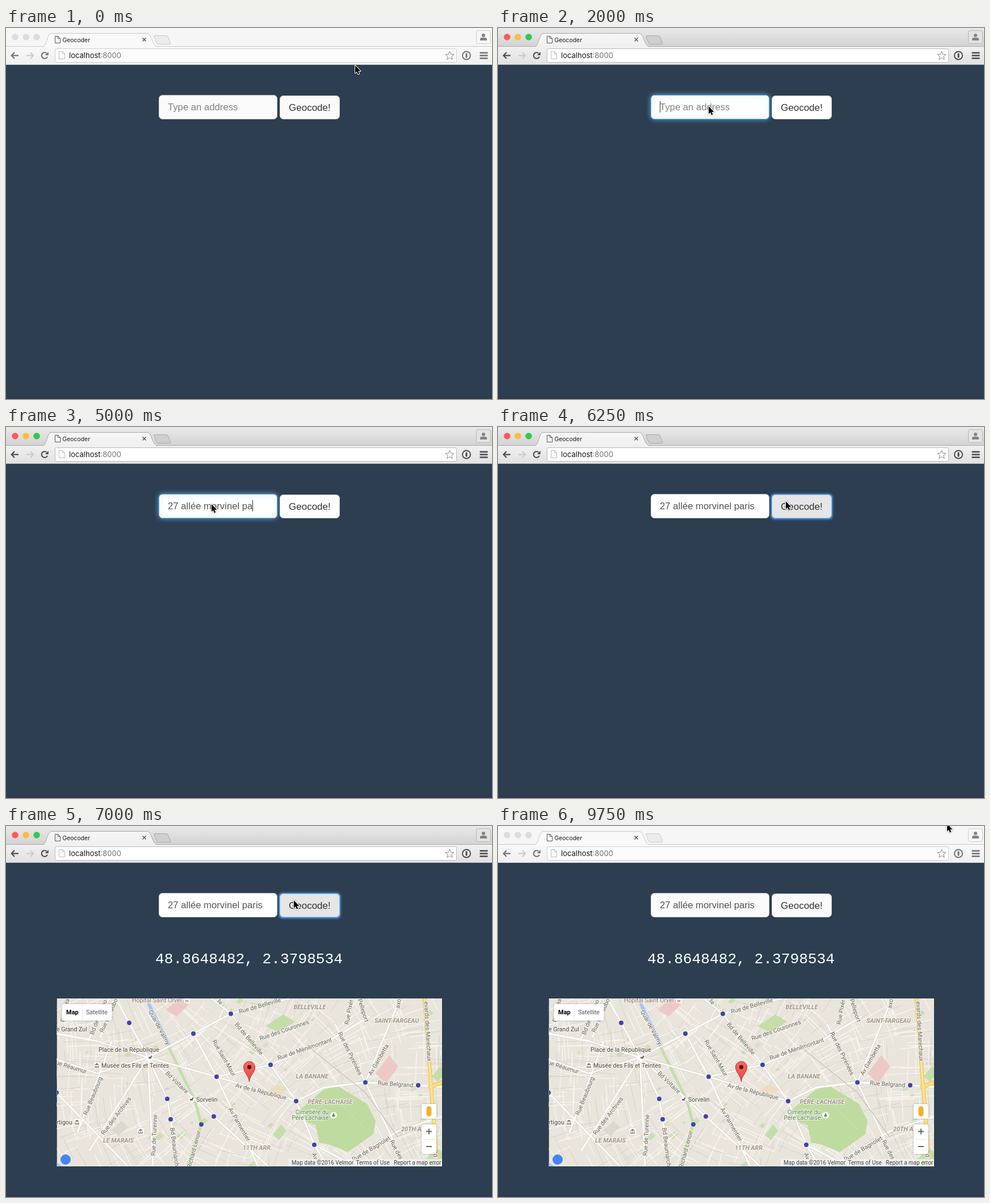
An HTML page with a canvas for the animation above (10000 ms loop, 856x654 px).

```html
<!DOCTYPE html>
<html lang="en">
<head>
<meta charset="utf-8">
<title>Geocoder</title>
<style>
html, body { margin: 0; width: 100%; height: 100%; overflow: hidden; background: #2c3e50; }
canvas { display: block; width: 856px; height: 654px; }
</style>
</head>
<body>
<canvas id="stage" width="856" height="654"></canvas>
<script>
const W = 856, H = 654, LOOP = 10000, STEP = 250;
const MAP = { x: 89.5, y: 304, w: 678.5, h: 296 };
const ADDRESS = '27 allée morvinel paris';
const SANS = '"Liberation Sans", Arial, sans-serif';
const UI = 'Inter, sans-serif';
const LABEL = 'Roboto, sans-serif';
const MONO = '"Liberation Mono", monospace';
const stage = document.getElementById('stage').getContext('2d');
let c = stage;

// ---- helpers ----
function trace(pts, closed) {
  c.beginPath();
  for (let i = 0; i < pts.length; i += 2) c.lineTo(pts[i], pts[i + 1]);
  if (closed) c.closePath();
}
function line(pts, color, width) {
  trace(pts);
  c.strokeStyle = color;
  c.lineWidth = width;
  c.stroke();
}
function poly(pts, color) {
  trace(pts, true);
  c.fillStyle = color;
  c.fill();
}
function rect(x, y, w, h, color) {
  c.fillStyle = color;
  c.fillRect(x, y, w, h);
}
function box(x, y, w, h, r, fill, stroke) {
  c.beginPath();
  c.roundRect(x, y, w, h, r);
  c.fillStyle = fill;
  c.fill();
  if (stroke) {
    c.strokeStyle = stroke;
    c.lineWidth = 1;
    c.stroke();
  }
}
function disc(x, y, r, color) {
  c.beginPath();
  c.arc(x, y, r, 0, 7);
  c.fillStyle = color;
  c.fill();
}
function patch(x, y, rx, ry, color) {
  poly([x - rx, y + ry * .3, x + rx * .2, y - ry, x + rx, y - ry * .2, x - rx * .1, y + ry], color);
}
function text(s, x, y, font, color, align = 'left') {
  c.font = font;
  c.textAlign = align;
  c.fillStyle = color;
  c.fillText(s, x, y);
}
function shade(y0, y1, top, bottom) {
  const g = c.createLinearGradient(0, y0, 0, y1);
  g.addColorStop(0, top);
  g.addColorStop(1, bottom);
  return g;
}
function glow(color, blur, draw) {
  c.save();
  c.shadowColor = color;
  c.shadowBlur = blur;
  draw();
  c.restore();
}

// ---- map ----
const HUBS = {
  magenta: [217, 347], goncourt: [330, 366], belle: [396, 331], maur: [371, 442],
  menil: [466, 421], lachaise: [511, 485], filles: [284, 481], sebastien: [290, 517],
  ambroise: [366, 512], lenoir: [344, 526], gambetta: [633, 452], bagnolet: [726, 457],
  auguste: [543, 562], reaumur: [89, 470]
};
const SQUARE = [250, 408];
const {
  magenta, goncourt, belle, maur, menil, lachaise, filles, sebastien,
  ambroise, gambetta, bagnolet, auguste, reaumur
} = HUBS;
const ROADS = [
  [[89, 366], [160, 379], SQUARE],
  [SQUARE, magenta, [193, 304]],
  [SQUARE, goncourt, belle, [500, 304]],
  [[362, 304], belle, menil, lachaise, auguste, [566, 600]],
  [SQUARE, ambroise, [462, 600]],
  [SQUARE, maur, lachaise],
  [maur, menil, [575, 375], [640, 336]],
  [[580, 350], gambetta, [704, 600]],
  [lachaise, [560, 461], gambetta, [694, 304]],
  [gambetta, bagnolet, [768, 460]],
  [auguste, [600, 592], [690, 538], [768, 512]],
  [goncourt, maur, [444, 600]],
  [[259, 600], SQUARE],
  [SQUARE, filles, sebastien, [302, 600]],
  [[147, 572], SQUARE],
  [[126, 540], [186, 380]],
  [[89, 411], [160, 436], SQUARE],
  [[145, 378], [182, 304]],
  [[166, 372], [198, 304]],
  [reaumur, [215, 600]]
].map(r => r.flat());

const DISTRICTS = [
  ['BELLEVILLE', 535, 322], ['SAINT-FARGEAU', 688, 346], ['LA BANANE', 539, 444],
  ['PÈRE-LACHAISE', 571, 489], ['LE MARAIS', 198, 557], ['11TH ARR.', 443, 570],
  ['20TH ARR.', 722, 537]
];
// text, centre x, centre y, degrees
const STREETS = [
  ["Rue d'Ha", 104, 325, -78], ['Bd de Strasbo', 163, 337, -68], ['Rue du Faubo', 181, 334, -66],
  ['Quai de Valmy', 270, 355, 62], ['ue Réaumur', 115, 425, 17], ['Rue Beaubourg', 153, 476, -68],
  ['Rue des Archives', 194, 511, -53], ['Bd Voltaire', 301, 452, 44], ['Rue de Turenne', 261, 545, -87],
  ['Bd Beaumarch', 297, 566, 83], ['Richard Lenoir', 331, 570, -75], ['Av Parmentier', 411, 526, 60],
  ['Av de la République', 449, 468, 14], ['Rue Saint-Maur', 384, 409, 60], ['Bd de Belleville', 428, 375, 50],
  ['te', 377, 310, 52], ['Rue de Belleville', 447, 317, -16], ['Rue des Couronnes', 490, 360, -19],
  ['Rue de Ménilmontant', 526, 393, -19], ['Rue des Pyrénées', 606, 401, 64], ['Rue Pixér', 604, 328, -80],
  ['Pelleport', 629, 325, 72], ['axo', 691, 313, -80], ['evards des Maréchaux', 743, 362, 87],
  ['Av Gambetta', 656, 412, -60], ['Rue Belgrand', 686, 455, 4], ['Rue de Bagnolet', 643, 569, -31],
  ['Rue des Py', 691, 577, 62], ['Bd Da', 757, 585, 84], ['Av Ph', 547, 589, 68]
];
const PLACES = [
  ['e Grand Zul', 89, 362], ['Place de la République', 163, 398],
  ['Musée des Fils et Teintes', 168, 426], ['Sorvelin', 335, 486], ['rtigou', 89, 526]
];

function haloText(s, x, y, font, color, align) {
  c.font = font;
  c.textAlign = align;
  c.lineJoin = 'round';
  c.lineWidth = 2.5;
  c.strokeStyle = 'rgba(245,243,237,.85)';
  c.strokeText(s, x, y);
  text(s, x, y, font, color, align);
}

function sideStreets() {
  let seed = 20;
  const rnd = () => (seed = (seed * 16807) % 2147483647) / 2147483647;
  for (let i = 0; i < 46; i++) {
    const x = MAP.x + rnd() * MAP.w, y = MAP.y + rnd() * MAP.h, s = 3 + rnd() * 6;
    patch(x, y, s, s * .8, i % 4 ? '#cbdfaf' : '#dedad0');
  }
  for (let i = 0; i < 620; i++) {
    const x = MAP.x + rnd() * MAP.w, y = MAP.y + rnd() * MAP.h;
    const turn = rnd() < .5 ? 0 : Math.PI / 2;
    const a = .75 + .45 * Math.sin(x / 95) + .35 * Math.cos(y / 70) + turn + rnd() * .15;
    const len = 10 + rnd() * 25, dx = Math.cos(a) * len, dy = Math.sin(a) * len;
    line([x - dx, y - dy, x + dx, y + dy], i % 3 ? '#f8f6f1' : '#d2cdc3', i % 3 ? 1.3 : .8);
  }
}

function paintMap() {
  const sheet = document.createElement('canvas');
  sheet.width = W;
  sheet.height = H;
  c = sheet.getContext('2d');
  c.beginPath();
  c.rect(MAP.x, MAP.y, MAP.w, MAP.h);
  c.clip();
  c.lineJoin = c.lineCap = 'round';
  rect(MAP.x, MAP.y, MAP.w, MAP.h, '#e9e5dc');
  sideStreets();

  const park = '#c4deaa', clinic = '#ecc9c6';
  patch(302, 319, 20, 17, clinic);
  patch(671, 429, 20, 25, clinic);
  patch(475, 467, 20, 13, '#ecdcc0');
  patch(200, 533, 15, 13, '#dcd8cf');
  patch(483, 348, 26, 16, park);
  patch(482, 540, 12, 14, park);
  patch(762, 437, 12, 14, park);
  patch(755, 585, 20, 18, park);
  poly([512, 505, 558, 466, 582, 457, 636, 490, 651, 520, 647, 543,
    602, 575, 571, 562, 552, 558, 545, 527, 514, 516], '#bfdba0');
  line([545, 500, 580, 480, 632, 533], '#cfe4b6', 1);

  line([284, 385, 333, 485, ...HUBS.lenoir, 320, 600], park, 5);
  line([252, 315, 266, 343, 287, 385], '#a3c6fb', 6);
  line([89, 596, 99, 604], '#a3c6fb', 6);

  ROADS.forEach(r => line(r, '#d6d0c4', 4));
  ROADS.forEach(r => line(r, '#ffffff', 2.8));
  line([540, 395, 633, 470, 690, 548], '#c8c4bb', 1.4);
  const ring = [737, 304, 748, 450, 760, 600];
  for (const [color, extra] of [['#e3b85a', 1.5], ['#fbdc7b', 0]]) {
    line(ring, color, 5 + extra);
    line([747, 460, 768, 452], color, 6 + extra);
  }
  line(ring, '#fff3c4', .8);

  for (const [x, y] of Object.values(HUBS)) {
    disc(x, y, 4.6, '#ffffff');
    disc(x, y, 4, '#3c47a5');
  }
  for (const [s, x, y, deg] of STREETS) {
    c.save();
    c.translate(x, y);
    c.rotate(deg * Math.PI / 180);
    haloText(s, 0, 3.5, '10.6px ' + LABEL, '#6b675f', 'center');
    c.restore();
  }
  for (const [s, x, y] of DISTRICTS)
    haloText(s, x, y + 1, 'italic bold 10.8px ' + LABEL, '#a1998a', 'center');
  for (const [s, x, y] of PLACES)
    haloText(s, x, y, '10.6px ' + LABEL, '#504a43', 'left');
  haloText('Hopital Saint Orvel', 222, 311, '10.6px ' + LABEL, '#92706d', 'left');
  rect(314, 304, 9, 8, '#ffffff');
  text('H', 318.5, 311, 'bold 8px ' + LABEL, '#d2605b', 'center');
  haloText('Cimetière du', 539, 508, '10.4px ' + LABEL, '#4f8a4c', 'center');
  haloText('Père Lachaise', 536, 518, '10.4px ' + LABEL, '#4f8a4c', 'center');
  disc(577, 510, 6, '#ffffff');
  poly([577, 505, 580, 512, 574, 512], '#5c9b56');
  rect(576.5, 511, 1, 3, '#5c9b56');

  for (const [x, y] of [[160, 422], [125, 522], [237, 538]]) {
    rect(x - 5, y - 5, 11, 10, '#ffffff');
    poly([x - 4, y - 1, x, y - 4, x + 4, y - 1], '#6d5f55');
    for (let i = -3; i < 4; i += 3) rect(x + i - .5, y, 1, 3, '#6d5f55');
    rect(x - 4, y + 3, 8, 1, '#6d5f55');
  }
  for (const [x, y] of [[254, 408], [327, 482]]) {
    disc(x, y, 5, '#ffffff');
    rect(x - 3, y - 1, 5, 3, '#756960');
    disc(x + 2, y - 2, 1.5, '#756960');
  }
  c = stage;
  return sheet;
}
const mapSheet = paintMap();

function mapControls() {
  glow('rgba(0,0,0,.3)', 3, () => {
    box(98.5, 314, 88, 29, 2, '#ffffff');
    box(732, 490, 26, 26, 2, '#ffffff');
    box(732, 526, 26, 52, 2, '#ffffff');
  });
  rect(134, 314, 1, 29, '#e8e8e8');
  text('Map', 106, 332, 'bold 11px ' + LABEL, '#000000');
  text('Satellite', 141, 332, '10.6px ' + LABEL, '#565656');
  box(740.5, 494, 9, 18, 4.5, '#f2b12d');
  rect(736, 552, 18, 1, '#e6e6e6');
  rect(740, 537.5, 10, 2, '#666666');
  rect(744, 533.5, 2, 10, '#666666');
  rect(740, 564, 10, 2, '#666666');
  disc(105, 588, 9, '#4285f4');

  rect(498, 587, 270, 13, 'rgba(245,245,245,.75)');
  const small = '10px ' + LABEL;
  text('Map data ©2016 Velmor', 503, 597, small, '#444444');
  text('Terms of Use', 616.5, 597, small, '#444444');
  text('Report a map error', 683, 597, small, '#444444');
}

function marker(x, y) {
  c.beginPath();
  c.moveTo(x, y);
  c.bezierCurveTo(x - 1, y - 12, x - 10, y - 16, x - 10, y - 26);
  c.arc(x, y - 26, 10, Math.PI, 0);
  c.bezierCurveTo(x + 10, y - 16, x + 1, y - 12, x, y);
  c.fillStyle = shade(y - 36, y, '#f9695d', '#e44c41');
  c.fill();
  c.strokeStyle = '#a8322b';
  c.lineWidth = 1;
  c.stroke();
  disc(x, y - 26, 3.7, '#5a1712');
}

// ---- browser window ----
function page(x, y, w, h, color) {
  const fold = x + w - 4;
  trace([x, y, fold, y, x + w, y + 4, x + w, y + h, x, y + h], true);
  c.fillStyle = '#ffffff';
  c.fill();
  c.strokeStyle = color;
  c.lineWidth = 1;
  c.stroke();
  line([fold, y, fold, y + 4, x + w, y + 4], color, 1);
}
function arrow(x, dir, color) {
  line([x, 48.5, x + dir * 13, 48.5], color, 2.2);
  line([x + dir * 6, 43, x + dir * .8, 48.5, x + dir * 6, 54], color, 2.2);
}

function chrome(active) {
  const ink = active ? '#4c4c4c' : '#727272';
  const edge = active ? '#a9a9a9' : '#c9c9c9';
  rect(0, 0, W, 33, active ? shade(0, 33, '#e9e9e9', '#d3d3d3') : '#f6f6f6');
  rect(0, 33, W, 32, active ? shade(33, 65, '#f0f0f0', '#e1e1e1') : shade(33, 65, '#f8f8f8', '#f0f0f0'));
  line([0, 32.5, W, 32.5], edge, 1);
  rect(0, 64, W, 1, active ? '#b5b5b5' : '#cfcfcf');

  const lights = active ? ['#fc5b57', '#fdbc40', '#34c84a'] : Array(3).fill('#dcdcdc');
  lights.forEach((color, i) => disc(16 + 19 * i, 16, 5.8, color));

  c.beginPath();
  c.moveTo(65, 33);
  c.bezierCurveTo(72, 32, 72, 9.5, 80, 9.5);
  c.lineTo(249, 9.5);
  c.bezierCurveTo(257, 9.5, 257, 32, 267, 33);
  c.fillStyle = active ? shade(9, 33, '#f6f6f6', '#f0f0f0') : '#f9f9f9';
  c.fill();
  c.strokeStyle = edge;
  c.lineWidth = 1;
  c.stroke();
  page(86.5, 14.5, 9, 12, '#505050');
  text('Geocoder', 99.5, 24.5, '10.4px ' + UI, '#1c1c1c');
  line([240.5, 17.5, 246.5, 23.5], '#5c5c5c', 1.6);
  line([246.5, 17.5, 240.5, 23.5], '#5c5c5c', 1.6);

  c.save();
  c.transform(1, 0, .4, 1, 260, 13.5);
  box(0, 0, 24.5, 15, 3, active ? '#cfcfcf' : '#ececec', edge);
  c.restore();

  box(828.5, 4.5, 25, 23, 3, active ? '#e3e3e3' : '#f7f7f7', active ? '#b5b5b5' : '#cccccc');
  disc(841, 13, 3, '#828282');
  box(835, 17, 12, 5, [3, 3, 0, 0], '#828282');

  arrow(9, 1, ink);
  arrow(49, -1, '#cccccc');
  c.beginPath();
  c.arc(68, 48.5, 5.3, .4, 5.4);
  c.strokeStyle = ink;
  c.lineWidth = 2.1;
  c.stroke();
  poly([74.8, 42, 74.8, 48, 68.8, 48], ink);

  box(86.5, 36.5, 707, 24, 2, active ? '#ffffff' : '#fcfcfc', active ? '#b9b9b9' : '#cecece');
  page(93.5, 41.5, 10, 13, '#b8b8b8');
  const url = '13px ' + UI;
  text('localhost', 111, 53.3, url, '#161616');
  text(':8000', 111 + c.measureText('localhost').width, 53.3, url, '#717171');

  const star = [];
  for (let i = 0; i < 11; i++) {
    const r = i % 2 ? 3.5 : 8, a = i * Math.PI / 5 - Math.PI / 2;
    star.push(781.5 + r * Math.cos(a), 49 + r * Math.sin(a));
  }
  line(star, '#8a8a8a', 1);
  disc(811, 48.5, 8, ink);
  disc(811, 48.5, 6, active ? '#ececec' : '#f6f6f6');
  box(809.5, 44.5, 3, 8, 1, ink);
  for (let i = 0; i < 3; i++) rect(834.5, 42.5 + i * 4.8, 14, 2.6, ink);
}

// ---- form ----
function typed(t) {
  if (t < 2500) return 0;
  if (t >= 5250) return ADDRESS.length;
  const k = (t - 2500) / STEP;
  return Math.max(Math.min(2 + 2 * k, 9), 2 * k);
}

function form(t, active) {
  const typing = t >= 2000 && t < 6250;
  const pressed = t >= 6250 && active;
  const over = t >= 6000 && active;
  const paper = active ? '#ffffff' : '#fafafa';
  const field = () => box(269.5, 118.5, 208, 42, 6, paper, typing ? '#66afe9' : '#cccccc');
  if (typing) glow('rgba(102,175,233,.9)', 8, field);
  else field();
  rect(273, 119, 201, 1, 'rgba(0,0,0,.06)');

  const shown = ADDRESS.slice(0, typed(t)), font = '16.7px ' + SANS;
  if (shown) text(shown, 285, 145, font, '#555555');
  else text('Type an address', 285, 145, font, '#808080');
  if (typing) rect(Math.round(285 + c.measureText(shown).width), 129, 1, 20, '#333333');

  if (pressed) glow('#3f8ae2', 4, () => {
    c.beginPath();
    c.roundRect(482, 119, 106, 42.5, 5);
    c.strokeStyle = '#3f86d8';
    c.lineWidth = 2.5;
    c.stroke();
  });
  box(482.5, 119.5, 105, 41, 6, over ? '#e6e6e6' : paper, pressed ? '#8fb6e4' : '#cccccc');
  text('Geocode!', 498, 146, '17px ' + SANS, '#333333');
}

// ---- pointer: time, x, y ----
const PATH = [[0, 615, 66], [1000, 420, 149], [1250, 420, 149], [2250, 362, 136], [5250, 362, 136],
  [6000, 507, 131], [8000, 507, 131], [8750, 738, 25], [9250, 768, 10], [9750, 791, -4]];
function pointer(t) {
  let i = 0;
  while (i < PATH.length - 2 && t >= PATH[i + 1][0]) i++;
  const [t0, x0, y0] = PATH[i], [t1, x1, y1] = PATH[i + 1];
  const p = Math.min(1, (t - t0) / (t1 - t0)), e = p * p * (3 - 2 * p);
  c.save();
  c.translate(x0 + (x1 - x0) * e, y0 + (y1 - y0) * e);
  trace([0, 0, 0, 13.5, 3, 10.8, 5, 15.5, 7.3, 14.5, 5.3, 10, 9.4, 10], true);
  c.lineJoin = 'round';
  glow('rgba(0,0,0,.4)', 3, () => {
    c.strokeStyle = '#ffffff';
    c.lineWidth = 2;
    c.stroke();
  });
  c.fillStyle = '#000000';
  c.fill();
  c.restore();
}

function draw(t) {
  const active = t >= 500 && t < 9500;
  rect(0, 0, W, H, '#2c3e50');
  rect(0, 650, W, 4, '#2f3a50');
  chrome(active);
  form(t, active);
  if (t >= 6500) {
    text('48.8648482, 2.3798534', 263, 242, '26.2px ' + MONO, '#ffffff');
    c.drawImage(mapSheet, 0, 0);
    if (t < 7000) {
      c.letterSpacing = '2px';
      haloText('Paris', 93, 596, '500 20px ' + LABEL, '#a59d90', 'left');
      c.letterSpacing = '0px';
    } else {
      marker(428.5, 451);
      mapControls();
    }
  }
  pointer(t);
}

const start = performance.now();
function tick() {
  const t = (performance.now() - start) % LOOP;
  draw(Math.floor(t / STEP) * STEP);
  requestAnimationFrame(tick);
}
tick();
</script>
</body>
</html>
```
